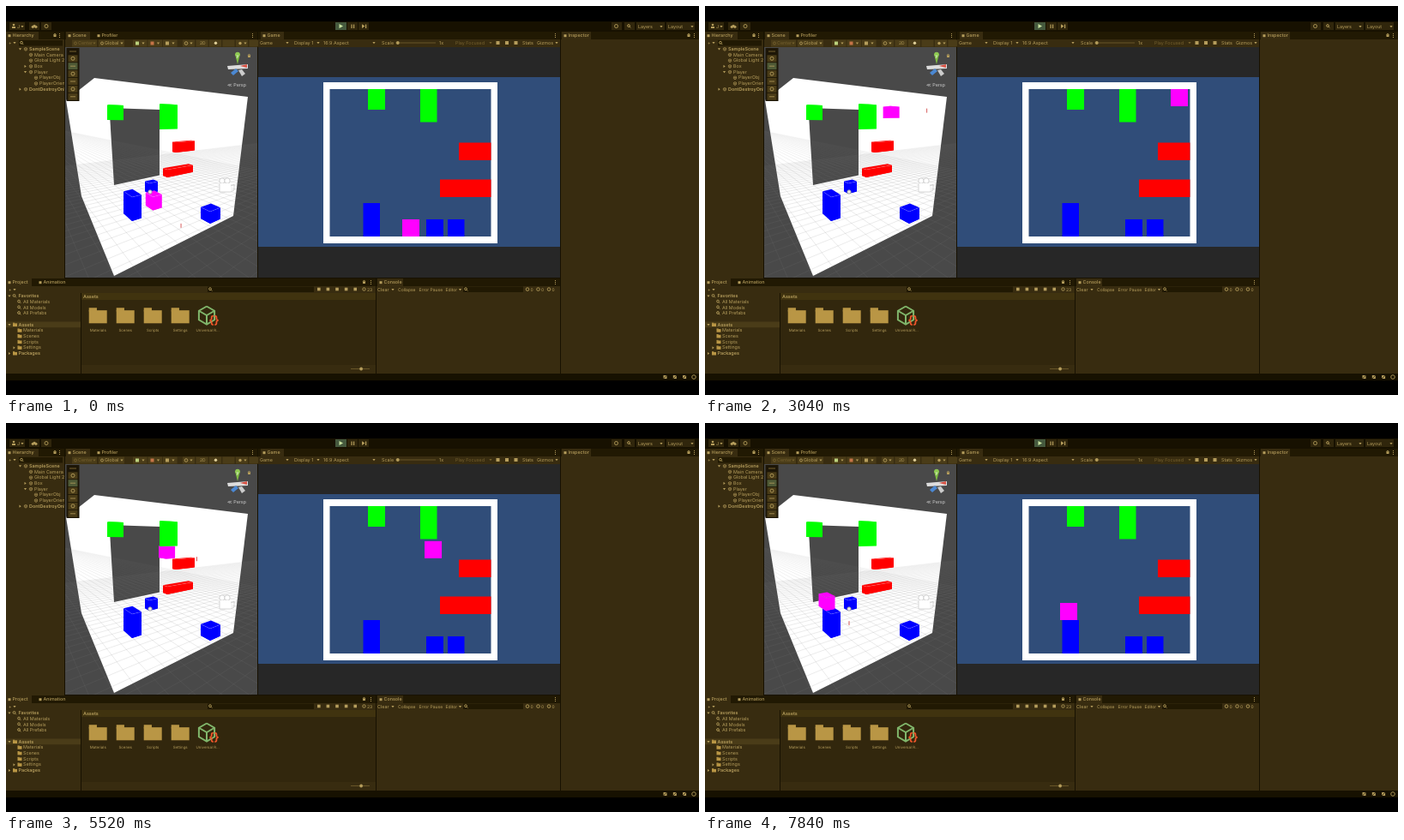
Write an HTML page with a canvas that moves like this. It is 808 by 454 pixels and loops after 7.92 s.

```html
<!DOCTYPE html>
<html lang="en">
<head>
<meta charset="utf-8">
<title>Game editor in play mode</title>
<style>
html, body { margin: 0; width: 100%; height: 100%; overflow: hidden; background: #000; }
canvas { display: block; }
</style>
</head>
<body>
<canvas id="stage" width="808" height="454"></canvas>
<script>
const c = document.getElementById('stage').getContext('2d');
const LOOP = 7920, STEP = 80, ROW = 6.7;
const PANEL = '#382c10', BAR = '#211903', EDGE = '#171101', INK = '#b59d5c', DIM = '#75612f', GOLD = '#b99645';
const GREEN = '#00ff00', RED = '#ff0000', BLUE = '#0000ff', PINK = '#ff00ff', SKY = '#494949';
const HORIZON = 136, VANISH_LEFT = 20, VANISH_RIGHT = 498;

// time, x, y of the player inside the game view
const path = [
  [0, 462, 249], [1040, 463, 179], [2160, 506, 136], [3040, 543, 97], [3600, 543, 97],
  [4640, 503, 122], [5200, 503, 136], [6400, 447, 143], [7840, 414, 210]
];

function rect(color, x, y, w, h) {
  c.fillStyle = color;
  c.fillRect(x, y, w, h);
}

function text(s, x, y, { size = 5.4, color = INK, weight = 400, align = 'left' } = {}) {
  c.font = `${weight} ${size}px Inter, Roboto, sans-serif`;
  c.textRendering = 'geometricPrecision';
  c.fillStyle = color;
  c.textAlign = align;
  c.textBaseline = 'middle';
  c.fillText(s, x, y);
}

function trace(pts) {
  c.beginPath();
  for (let i = 0; i < pts.length; i += 2) c.lineTo(pts[i], pts[i + 1]);
}

function poly(color, ...pts) {
  trace(pts);
  c.fillStyle = color;
  c.fill();
}

function line(color, width, ...pts) {
  trace(pts);
  c.strokeStyle = color;
  c.lineWidth = width;
  c.stroke();
}

function dot(x, y, r, color = INK) {
  c.beginPath();
  c.arc(x, y, r, 0, 7);
  c.fillStyle = color;
  c.fill();
}

function ring(x, y, r, color = INK) {
  c.beginPath();
  c.arc(x, y, r, 0, 7);
  c.strokeStyle = color;
  c.lineWidth = 0.9;
  c.stroke();
}

function clip(x, y, w, h, paint) {
  c.save();
  c.beginPath();
  c.rect(x, y, w, h);
  c.clip();
  paint();
  c.restore();
}

function arrow(x, y, down = true, color = INK) {
  if (down) poly(color, x - 1.6, y - 1, x + 1.6, y - 1, x, y + 1.2);
  else poly(color, x - 1, y - 1.6, x + 1.2, y, x - 1, y + 1.6);
}

function dropdown(s, x, y, end, color) {
  text(s, x, y, { color });
  arrow(end, y, true, color);
}

function lens(x, y) {
  ring(x, y, 1.4);
  line(INK, 0.8, x + 1, y + 1, x + 2.4, y + 2.4);
}

function search(x, y, w) {
  rect(BAR, x, y, w, 6.5);
  lens(x + 3, y + 2.7);
}

function menu(x, y) {
  for (let i = -1; i < 2; i++) rect(INK, x, y + i * 2 - 0.5, 1, 1);
}

function lock(x, y) {
  ring(x, y, 1.1);
  rect(INK, x - 1.5, y, 3, 2.5);
}

function slider(x, y, w, k) {
  line(DIM, 0.8, x, y, x + w, y);
  dot(x + w * k, y, 1.9);
}

function folder(x, y, s) {
  rect(GOLD, x, y - s * 0.06, s * 0.44, s * 0.2);
  rect(GOLD, x, y + s * 0.08, s, s * 0.72);
}

function cubeIcon(x, y, r, color, width) {
  const rim = a => [x + r * Math.sin(a * Math.PI / 3), y - r * Math.cos(a * Math.PI / 3)];
  line(color, width, ...[0, 1, 2, 3, 4, 5, 6].flatMap(rim));
  for (const a of [1, 3, 5]) line(color, width, x, y, ...rim(a));
}

function panel(x, y, w, h) {
  rect(BAR, x, y, w, 9);
  rect(PANEL, x, y + 9, w, h - 9);
  menu(x + w - 6, y + 4.5);
}

function tab(label, x, y, w) {
  if (w) rect(PANEL, x, y, w, 9);
  rect(INK, x + 2.5, y + 3.2, 3, 3);
  text(label, x + 7.5, y + 4.8, { weight: 500 });
}

// Indented rows: leading spaces give the depth, +/- an open or closed arrow.
function tree(rows, x, y, indent, icon) {
  rows.forEach((row, i) => {
    const depth = row.search(/\S/), mark = row[depth], ry = y + i * ROW;
    const label = row.slice(depth).replace(/^[+-]/, ''), left = x + depth * indent;
    text(label, left, ry, { weight: depth ? 400 : 600 });
    if (mark === '+' || mark === '-') arrow(left - 10.5, ry, mark === '+');
    icon(left - 4, ry);
  });
}

function playerAt(t) {
  const i = Math.max(1, path.findIndex(p => p[0] >= t));
  const [t0, x0, y0] = path[i - 1], [t1, x1, y1] = path[i];
  const k = (t - t0) / (t1 - t0);
  return [x0 + (x1 - x0) * k, y0 + (y1 - y0) * k];
}

function topBar() {
  rect('#45593e', 384, 19, 13, 9);
  for (const x of [398, 411]) rect('#30260c', x, 19, 12, 9);
  for (const x of [27, 41, 706, 721]) rect('#30260c', x, 19, 12, 9);
  for (const x of [4, 735, 770]) rect('#30260c', x, 19, x < 9 ? 18 : 33, 9);
  dot(9, 22, 1.3);
  rect(INK, 7, 24, 4, 2);
  dropdown('J', 13, 24, 19);
  for (let i = 0; i < 3; i++) dot(31.3 + i * 1.8, 24.3 - i % 2, 1.6);
  ring(47, 23.5, 2);
  poly('#c9e3a0', 388.5, 21, 393, 23.5, 388.5, 26);
  for (const x of [402.5, 405, 419]) rect(INK, x, 21.5, 1.2, 4.5);
  poly(INK, 415, 21.3, 418.5, 23.6, 415, 26);
  ring(711.5, 23.5, 2);
  lens(726, 23);
  dropdown('Layers', 737, 24, 764);
  dropdown('Layout', 772, 24, 800);
}

function hierarchy() {
  panel(0, 30, 68, 288);
  tab('Hierarchy', 0, 30, 38);
  lock(57, 33.5);
  dropdown('+', 3, 43, 10);
  search(15, 40, 51);
  const rows = ['+SampleScene', ' Main Camera', ' Global Light 2D', ' -Box', ' +Player', '  PlayerObj', '  PlayerOrient', '-DontDestroyOnLoad'];
  clip(0, 46, 68, 60, () => tree(rows, 27, 50.3, 6, (x, y) => cubeIcon(x, y, 1.9, INK, 0.6)));
}

function sceneHeader() {
  panel(69, 30, 224, 18);
  tab('Scene', 70, 30, 28);
  tab('Profiler', 104, 30);
  rect('#4a3c18', 77, 39.5, 29, 8);
  rect('#4a3c18', 108, 39.5, 30, 8);
  ring(81, 43.5, 1.5, DIM);
  dropdown('Center', 84, 43.5, 103, DIM);
  ring(112, 43.5, 1.5);
  dropdown('Global', 115, 43.5, 135);
  ['#bbd27d', '#c57447', INK].forEach((color, i) => {
    const x = 148 + i * 17.5;
    rect('#4a3c18', x, 39.5, 16.5, 8);
    rect(color, x + 3, 41.5, 4, 4);
    arrow(x + 12, 43.5);
  });
  for (let x = 206; x < 290; x += 15.5) rect('#4a3c18', x, 39.5, 14, 8);
  ring(210, 43.5, 1.8);
  arrow(216, 43.5);
  text('2D', 226, 43.7, { size: 5 });
  dot(244.5, 43.3, 1.7, '#e0d09a');
  dot(273, 43.5, 1.7);
  arrow(279, 43.5);
}

// Floor lines meet at the two vanishing points and fade towards the horizon.
function grid() {
  const fade = c.createLinearGradient(0, HORIZON, 0, 200);
  fade.addColorStop(0, 'rgba(120,120,120,.07)');
  fade.addColorStop(1, 'rgba(120,120,120,.3)');
  for (let i = -30; i < 30; i++) {
    line(fade, 0.5, VANISH_RIGHT, HORIZON, i * 42, 345);
    line(fade, 0.5, VANISH_LEFT, HORIZON, i * 36, 345);
  }
}

// A block in two-point perspective, given its nearest vertical edge and its left and right extents.
function block(color, near, top, bottom, left, right) {
  const toward = (vx, x, y) => y + (HORIZON - y) * (x - near) / (vx - near);
  const cap = y => {
    const ly = toward(VANISH_LEFT, left, y), ry = toward(VANISH_RIGHT, right, y);
    const a = (HORIZON - ly) / (VANISH_RIGHT - left), b = (HORIZON - ry) / (VANISH_LEFT - right);
    const x = Math.abs(a - b) < 1e-4 ? near : (ry - ly + a * left - b * right) / (a - b);
    return [left, ly, near, y, right, ry, x, ly + a * (x - left)];
  };
  const t = cap(top), b = cap(bottom);
  poly(color, ...t);
  poly(color, ...b);
  poly(color, ...t.slice(0, 6), b[4], b[5], b[2], b[3], b[0], b[1]);
  line('rgba(255,255,255,.25)', 0.5, ...t.slice(0, 6));
}

function scenePlayer(px, py) {
  const d = px - 414;
  const x = 142 + 0.66 * d - 0.0006 * d * d;
  const y = 180.5 + 0.68 * (py - 179) - (px - 463) * 0.0014 * (py - 90);
  const mid = y + (y - HORIZON) * 0.025, half = 7 + (py - 97) * 0.006;
  block(PINK, x - 1, mid - half, mid + half, x - 9.5, x + 9.5);

  const rayX = x + 26 + 0.12 * d, rayY = y + 28 - (249 - py) * 0.17 - (px - 463) * 0.05;
  line('#c33', 0.8, rayX, rayY - 2.5, rayX, rayY + 2.5);
}

function axisWidget() {
  poly('#7fbd42', 267, 56, 273, 56, 270, 68);
  dot(270, 56.5, 2.8, '#8fca53');
  poly('#ddd', 258, 70, 282, 68, 282, 73, 259, 74);
  poly('#d95143', 273, 70, 281, 68, 281, 72);
  poly('#4b88d2', 262, 78, 268, 73, 271, 76, 265, 81);
  poly('#ccc', 271, 75, 275, 74, 279, 79, 275, 82);
  text('y', 268.5, 58, { size: 5, color: '#fff' });
  text('≪ Persp', 269, 92, { color: '#ccc', align: 'center' });
  lock(283.5, 57.5);
}

function toolStrip() {
  rect('#1d1607', 70.5, 49, 15, 62);
  line(DIM, 1, 74, 53, 82, 53);
  for (let i = 0; i < 6; i++) {
    const y = 61.3 + i * 8.9;
    rect(i === 1 ? '#4f5a36' : '#493b17', 72.5, y - 4, 11, 8);
    if (i % 2) line(INK, 0.8, 75, y, 81, y);
    else ring(78, y, 2);
  }
}

function sceneView(px, py) {
  rect(SKY, 69, 48, 224, 269);
  poly('#fff', 103, 84, 282, 106, 265, 245, 126, 315, 88, 222, 70, 110);
  poly(SKY, 120.5, 119, 179, 121, 179, 197.5, 126, 209);
  clip(69, HORIZON, 224, 181, grid);

  block(BLUE, 167, 207, 219, 162, 177);
  block(BLUE, 147, 223, 251, 137, 158);
  block(BLUE, 238, 240, 254, 227, 250);
  scenePlayer(px, py);
  block(RED, 198, 159, 171, 194, 220);
  block(RED, 188, 191, 200, 183, 218);
  block(GREEN, 120, 115, 133, 118, 137);
  block(GREEN, 181, 114, 144, 179, 200);

  for (const x of [252, 258]) {
    dot(x, 204, 3.2, '#fff');
    ring(x, 204, 3.2, '#ccc');
  }
  rect('#fff', 249, 207, 13, 10);
  line('#ccc', 0.8, 249, 207, 249, 217, 262, 217, 266, 215, 266, 208, 262, 210);
  dot(168, 217, 2.2, '#eee');
  ring(168, 217, 2.2, '#999');
  axisWidget();
  toolStrip();
}

function gameView(px, py) {
  panel(294, 30, 352, 18);
  tab('Game', 297, 30, 27);
  dropdown('Game', 296, 43, 328);
  dropdown('Display 1', 336, 43, 364);
  dropdown('16:9 Aspect', 370, 43, 429);
  text('Scale', 438, 43);
  slider(454, 43, 47, 0.06);
  text('1x', 505, 43);
  dropdown('Play Focused', 524, 43, 565, DIM);
  for (let i = 0; i < 3; i++) rect(INK, 571.5 + i * 10.5, 41, 4, 4);
  text('Stats', 602, 43);
  dropdown('Gizmos', 619, 43, 642);

  rect('#272727', 294, 48, 352, 269);
  rect('#304d79', 294, 83, 352, 198);
  rect('#fff', 370, 89, 203, 188);
  rect('#304d79', 377.5, 97, 188, 172);
  rect(GREEN, 422, 97, 20, 24);
  rect(GREEN, 483, 97, 19.5, 38.5);
  rect(RED, 528, 159.5, 37.5, 20.5);
  rect(RED, 506, 202.5, 59.5, 20.5);
  rect(BLUE, 416.5, 230, 19.5, 39);
  rect(BLUE, 490, 249, 20, 20);
  rect(BLUE, 515, 249, 19.5, 20);
  rect(PINK, px, py, 20, 20);
}

function project() {
  panel(0, 318, 431, 111);
  tab('Project', 0, 318, 30);
  tab('Animation', 36, 318);
  lock(417.5, 321.5);
  dropdown('+', 3, 331, 10);
  search(235, 327.5, 124);
  for (let i = 0; i < 5; i++) rect(INK, 363 + i * 10.6, 328.7, 3.6, 3.6);
  ring(417.5, 330.5, 1.7);
  text('23', 421, 331, { size: 5 });
  rect('#32270d', 88, 335, 343, 94);
  rect('#40330f', 88, 335, 343, 8);
  rect(EDGE, 87, 335, 1, 94);
  text('Assets', 90, 339.2, { weight: 600 });

  tree(['+Favorites', ' All Materials', ' All Models', ' All Prefabs'], 14.5, 338.5, 5.5, (x, y) => lens(x - 1, y - 0.6));
  rect('#4a3c18', 0, 368.5, 87, ROW);
  tree(['+Assets', ' Materials', ' Scenes', ' Scripts', ' -Settings', '-Packages'], 14.5, 372, 5.5, (x, y) => folder(x - 2.5, y - 2, 5));

  const label = { size: 4.4, align: 'center' };
  ['Materials', 'Scenes', 'Scripts', 'Settings', 'Universal R...'].forEach((s, i) => {
    const x = 107.2 + i * 32;
    if (i < 4) folder(x - 10.5, 353.5, 21);
    text(s, x, 378.7, label);
  });
  cubeIcon(234, 361, 10.5, '#80b66b', 2);
  text('{}', 242.5, 367, { size: 13, color: '#f0572b', weight: 700, align: 'center' });
  rect(PANEL, 88, 419, 343, 10);
  slider(402, 423.5, 22, 0.55);
}

function consolePanel() {
  panel(432, 318, 214, 111);
  tab('Console', 433, 318, 30);
  dropdown('Clear', 433, 331, 451);
  const small = { size: 5 };
  text('Collapse', 457, 331, small);
  text('Error Pause', 481.5, 331, small);
  text('Editor', 512.5, 331, small);
  arrow(529.5, 331);
  search(533, 327.5, 70);
  for (let x = 608; x < 640; x += 12.5) {
    ring(x, 330.6, 1.8);
    text('0', x + 3.5, 331, small);
  }
}

function inspector() {
  panel(647, 30, 161, 399);
  tab('Inspector', 648, 30, 34);
  lock(796, 33.5);
}

function statusBar() {
  for (let i = 0; i < 3; i++) {
    const x = 768.5 + i * 11.3;
    rect(INK, x - 2, 431, 4, 4);
    line(EDGE, 0.8, x - 2, 435, x + 2, 431);
  }
  ring(802, 433, 2.3);
}

function draw(now) {
  const t = Math.floor(now % LOOP / STEP) * STEP;
  const [px, py] = playerAt(t);
  rect('#000', 0, 0, 808, 454);
  rect(EDGE, 0, 18, 808, 419);
  topBar();
  hierarchy();
  sceneHeader();
  sceneView(px, py);
  gameView(px, py);
  project();
  consolePanel();
  inspector();
  statusBar();
}

const start = performance.now();
function tick() {
  draw(performance.now() - start);
  requestAnimationFrame(tick);
}
tick();
</script>
</body>
</html>
```
